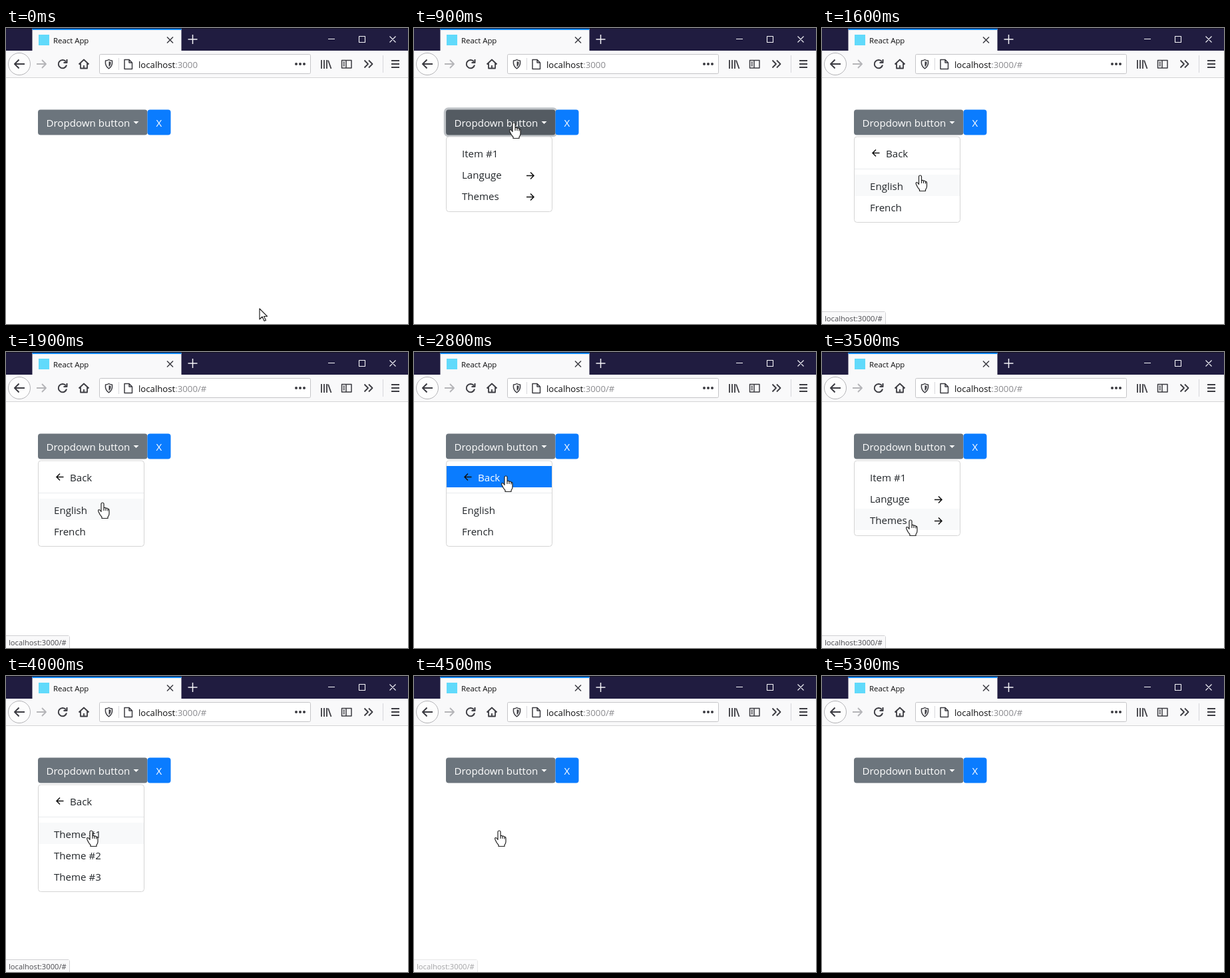
Animation, 604 px wide and 444 px high, one loop 5900 ms. Source, as an HTML page:

```html
<!DOCTYPE html>
<html lang="en">
<head>
<meta charset="utf-8">
<title>Dropdown menu</title>
<style>
html, body { margin: 0; width: 100%; height: 100%; overflow: hidden; background: #fff; }
svg { display: block; font: 15.1px "Open Sans", "Noto Sans", sans-serif; fill: #212529; }
.icon { fill: none; stroke: #3c3c42; stroke-width: 1.8; stroke-linejoin: round; }
.thin { stroke-width: 1.5; }
.light { stroke: #f4f4f8; stroke-width: 1.1; }
.cursor { fill: #fff; stroke: #222; stroke-width: 1.2; stroke-linejoin: round; }
.arrow { fill: none; stroke: #111; stroke-width: 1.5; }
</style>
</head>
<body>
<svg width="604" height="444" viewBox="0 0 604 444">
  <!-- title bar -->
  <rect width="604" height="34" fill="#201c40"/>
  <rect x="39.5" y="1" width="224" height="33" fill="#f9f9fa"/>
  <rect x="39.5" y="1" width="224" height="2" fill="#0a84ff"/>
  <rect width="604" height="1" fill="#12101f"/>
  <rect x="49" y="10" width="16" height="16" fill="#61dafb"/>
  <text x="71" y="22.5" font-size="11.4" fill="#0c0c0d">React App</text>
  <path class="icon thin" d="M242 13.5l9 9m0-9l-9 9"/>
  <path class="icon light" d="M273.500 17h14M280.500 10v14" style="stroke-width:1.5"/>
  <path class="icon light" d="M484 16.500h10M530.500 12.500h9v9h-9zM576.500 12.500l9 9m0-9l-9 9"/>
  <!-- toolbar -->
  <rect y="34" width="604" height="40" fill="#f9f9fa"/>
  <rect y="74" width="604" height="1" fill="#d4d4d6"/>
  <circle cx="20" cy="54" r="16.500" fill="#fdfdfd" stroke="#b4b4b7"/>
  <path class="icon" d="M28 54H13m6.500-6.500L13 54l6.500 6.500" style="stroke-width:2"/>
  <path class="icon" d="M46 54h14m-6-6l6 6-6 6" style="stroke:#b5b5b8"/>
  <path class="icon" d="M90 50.500a6.200 6.200 0 1 0 1 5M91.500 47v5h-5" style="stroke-width:2"/>
  <path class="icon" d="M109.500 54.500l7.500-7 7.500 7M112 53v7.500h10V53M117 60.500v-4.500"/>
  <rect x="140.500" y="39.500" width="317" height="29" rx="2" fill="#fff" stroke="#c4c4c7"/>
  <path class="icon thin" d="M149.500 49q3 0 5-1.500 2 1.500 5 1.500 1 8-5 12-6-4-5-12z"/>
  <path d="M154.500 50v8.500q3.500-3 3-7.500z" fill="#3c3c42"/>
  <path d="M169.500 45v18M566.500 41v26" stroke="#d7d7db"/>
  <path class="icon thin" d="M178 47.500h7l4.500 4.500v9.500H178zM185 47.500V52h4.500"/>
  <g fill="#3c3c42"><circle cx="436" cy="54" r="2"/><circle cx="442" cy="54" r="2"/><circle cx="448" cy="54" r="2"/></g>
  <path class="icon" d="M474 48v13M478 48v13M482 48v13M484 48.500l4.500 12.500"/>
  <path class="icon thin" d="M504.500 48.500h14.500v11.500h-14.500zM511 48.500V60M506.500 51.500h2.500M506.500 54h2.500M506.500 56.500h2.500"/>
  <path class="icon" d="M538.500 48.500l5.500 5.500-5.500 5.500M545 48.500l5.500 5.500-5.500 5.500"/>
  <path class="icon" d="M579 49h12M579 54h12M579 59h12"/>
  <text x="199" y="59.500" font-size="13.2" fill="#0c0c0d">localhost<tspan fill="#8a8a8e">:3000<tspan id="hash">/#</tspan></tspan></text>
  <!-- page -->
  <g id="scene"></g>
  <g id="status">
    <path d="M0 425.500h93q2.500 0 2.500 2.500v16" fill="#f9f9fa" stroke="#d0d0d3"/>
    <rect y="426" width="95" height="18" fill="#f9f9fa"/>
    <text x="4" y="440" font-size="11.2" fill="#4a4a4f">localhost:3000/#</text>
  </g>
  <g id="cursor" class="cursor">
    <path id="pointer" d="M0 0v16l4-4 3 6.500 2.500-1-3-6h5z"/>
    <path id="hand" d="M-2 2a2 2 0 0 1 4 0v6q2-1.500 3 .5 2-1 3 1 2-.5 2 2v5q0 3-2 5v2h-9v-2q-3-3-5-8-1-3 1-3 1 0 3 3zM2 8v4M5 8.500v3.500M8 9.500v3"/>
  </g>
</svg>
<script>
const $ = id => document.getElementById(id);
const DURATION = 5900, STEP = 100;

// [time, x, y] of the cursor's hot spot
const path = [
  [0, 381, 421], [100, 378, 412], [300, 350, 337], [400, 250, 249], [600, 150, 142],
  [900, 150, 142], [1100, 150, 214], [1300, 150, 216], [1900, 145, 226], [2000, 145, 226],
  [2300, 138, 190], [2500, 138, 186], [3000, 138, 186], [3200, 133, 252], [3700, 133, 252],
  [4000, 128, 232], [4800, 128, 232], [5200, 352, 276]
];
const fades = [[1200, 0], [1400, 1], [2200, 1], [2400, 0], [3100, 0], [3300, 1], [4400, 1], [4600, 0]];
const presses = [[1100, 1200], [2700, 3000], [3600, 3700], [4300, 4500]];
const menus = {
  main: ["Item #1", "Languge", "Themes"],
  language: ["Back", "English", "French"],
  themes: ["Back", "Theme #1", "Theme #2", "Theme #3"]
};

function sample(keys, t, k = 1) {
  const i = keys.findIndex(key => key[0] > t);
  if (i < 0) return keys[keys.length - 1][k];
  if (i === 0) return keys[0][k];
  const a = keys[i - 1], b = keys[i];
  return a[k] + (b[k] - a[k]) * (t - a[0]) / (b[0] - a[0]);
}

const during = (t, [from, to]) => t >= from && t < to;

function menuAt(t) {
  if (t < 800 || t >= 4500) return null;
  if (t < 1200) return "main";
  if (t < 3000) return "language";
  return t < 3700 ? "main" : "themes";
}

function drawButtons(t) {
  const focused = during(t, [700, 1100]);
  const fill = focused ? "#545b62" : during(t, [600, 1000]) ? "#5a6268" : "#6c757d";
  const ring = focused ? '<rect x="46.500" y="121" width="167.500" height="40.500" rx="5" fill="none" stroke="#bfc3c7" stroke-width="3.500"/>' : "";
  return `${ring}<rect x="48" y="122.500" width="164.500" height="38" rx="4" fill="${fill}"/>
    <rect x="212.500" y="122.500" width="35" height="38" rx="4" fill="#0a7cff"/>
    <g fill="#fff"><text x="60.500" y="148">Dropdown button</text>
    <path d="M191.500 140h8l-4 4z"/><text x="225.500" y="148">X</text></g>`;
}

function drawMenu(name, y, pressed) {
  const items = menus[name], sub = name !== "main";
  const height = items.length * 32 + (sub ? 33 : 17);
  let out = `<rect x="48.500" y="163" width="159" height="${height - 0.5}" rx="4" fill="#fff" stroke="#d5d5d5"/>`;
  if (sub) out += '<path d="M49 211.500h158" stroke="#e9ecef"/>';
  items.forEach((label, i) => {
    const top = 171 + i * 32 + (sub && i ? 17 : 0), mid = top + 16.500;
    const hover = y >= top && y < top + 32, back = label === "Back";
    if (hover) out += `<rect x="49" y="${top}" width="158" height="32" fill="${pressed ? "#0a7cff" : "#f8f9fa"}"/>`;
    out += `<text x="${back ? 96 : 72}" y="${top + 22.500}"${hover && pressed ? ' fill="#fff"' : ""}>${label}</text>`;
    if (back) out += `<path class="arrow" d="M86.500 ${mid}H76m5-5l-5 5 5 5"/>`;
    else if (!sub && i) out += `<path class="arrow" d="M169 ${mid + 2}h11m-5-5l5 5-5 5"/>`;
  });
  return out;
}

function render(t) {
  const x = sample(path, t), y = sample(path, t, 2), menu = menuAt(t);
  const pressed = presses.some(span => during(t, span));
  $("scene").innerHTML = drawButtons(t) + (menu ? drawMenu(menu, y, pressed) : "");
  $("hash").style.display = t < 1200 ? "none" : "";
  $("status").style.opacity = sample(fades, t);
  const hand = during(t, [600, 4900]);
  $("hand").style.display = hand ? "" : "none";
  $("pointer").style.display = hand ? "none" : "";
  $("cursor").style.display = t < 5300 ? "" : "none";
  $("cursor").setAttribute("transform", `translate(${x} ${y})`);
}

let start, last;
function tick(now) {
  start ??= now;
  const t = Math.floor((now - start) % DURATION / STEP) * STEP;
  if (t !== last) render(last = t);
  requestAnimationFrame(tick);
}
render(0);
requestAnimationFrame(tick);
</script>
</body>
</html>
```
